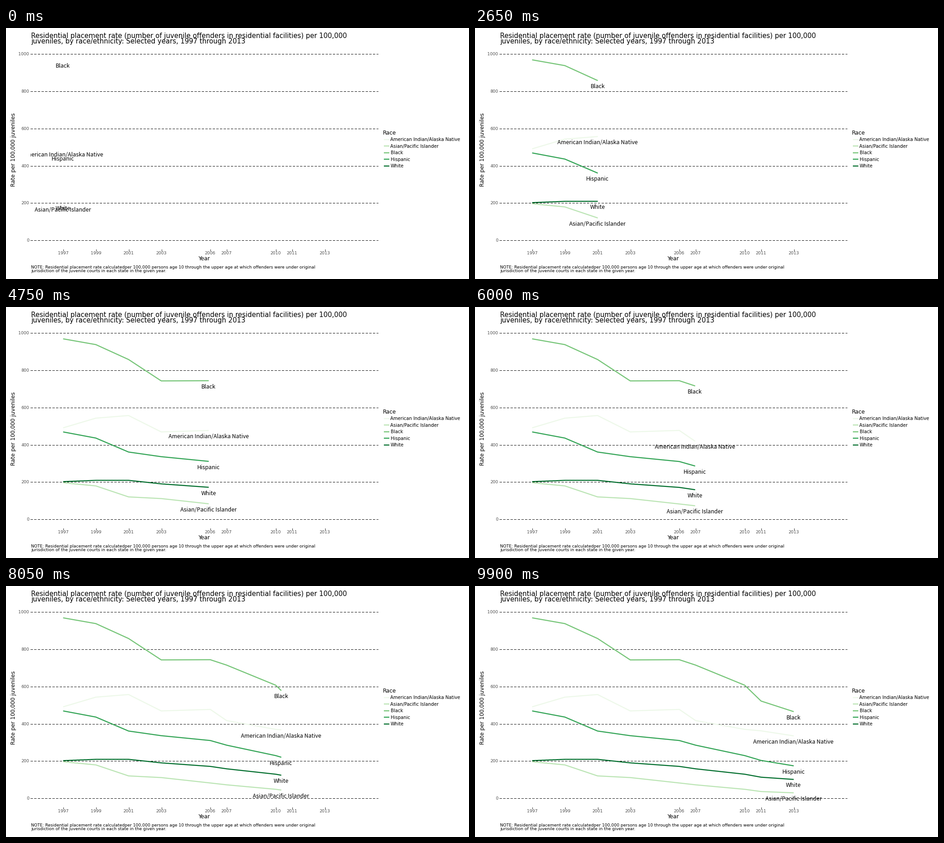
A matplotlib script that plays this animation: 1017x551 px, repeating every 10000 ms.

```python
import numpy as np
import matplotlib.pyplot as plt
from matplotlib.animation import FuncAnimation

W, H, DPI = 1017, 551, 64
FRAMES, STEP = 200, 25  # STEP frames per survey interval

YEARS = np.array([1997, 1999, 2001, 2003, 2006, 2007, 2010, 2011, 2013])
SERIES = {
    "American Indian/Alaska Native": ("#edf8e9", [490, 542, 556, 468, 476, 416, 369, 361, 334]),
    "Asian/Pacific Islander": ("#bae4b3", [195, 178, 119, 110, 81, 71, 47, 35, 28]),
    "Black": ("#74c476", [968, 937, 857, 742, 743, 714, 606, 521, 464]),
    "Hispanic": ("#31a354", [468, 435, 360, 335, 309, 284, 228, 202, 173]),
    "White": ("#006d2c", [201, 208, 208, 189, 170, 157, 128, 112, 100]),
}
X_1997, PX_PER_YEAR = 125.5, 35.92
Y_ZERO, PX_PER_RATE = 465.5, 0.4087
LEFT, RIGHT = 54, 817
LABEL_DROP = 16.8


def px(size):
    """Pixels to points."""
    return size * 72 / DPI


def year_x(year):
    return X_1997 + (np.asarray(year) - 1997) * PX_PER_YEAR


def rate_y(rate):
    return Y_ZERO - np.asarray(rate) * PX_PER_RATE


def pixel_axes(left, top, right, bottom):
    ax = fig.add_axes([left / W, 1 - bottom / H, (right - left) / W, (bottom - top) / H])
    ax.set(xlim=(left, right), ylim=(bottom, top))
    ax.axis("off")
    return ax


def write(x, y, text, size, color="black", **kwargs):
    return page.text(x, y, text, fontsize=px(size), color=color, va="baseline",
                     family="DejaVu Sans", **kwargs)


def cubic_in_out(t):
    return 4 * t ** 3 if t < 0.5 else 1 - 4 * (1 - t) ** 3


fig = plt.figure(figsize=(W / DPI, H / DPI), dpi=DPI, facecolor="white")
page = pixel_axes(0, 0, W, H)
panel = pixel_axes(LEFT, 36, RIGHT, 486)

# Titles and note
write(55, 22, "Residential placement rate (number of juvenile offenders in "
      "residential facilities) per 100,000", 14.75)
write(55, 34, "juveniles, by race/ethnicity: Selected years, 1997 through 2013", 14.75)
write(436, 509.5, "Year", 12, ha="center")
write(20.5, 267.5, "Rate per 100,000 juveniles", 12, ha="center", rotation=90,
      rotation_mode="anchor")
write(55, 528, "NOTE: Residential placement rate calculatedper 100,000 persons age 10 "
      "through the upper age at which offenders were under original", 9.07)
write(55, 536, "jurisdiction of the juvenile courts in each state in the given year.", 9.07)

# Grid and axis ticks
for rate in range(0, 1001, 200):
    y = np.floor(rate_y(rate)) + 0.5
    page.plot([LEFT, RIGHT], [y, y], color="black", lw=px(1), dashes=(4, 3),
              antialiased=False)
    write(50.8, y + 3.5, str(rate), 9.2, "#4d4d4d", ha="right")
for year in YEARS:
    x = np.floor(year_x(year)) + 0.5
    page.plot([x, x], [486, 489], color="#333333", lw=px(1), antialiased=False,
              solid_capstyle="butt")
    write(x, 497, str(year), 9.2, "#4d4d4d", ha="center")

# Legend
write(827.5, 234, "Race", 11.9)
lines, labels = [], []
for i, (name, (color, _)) in enumerate(SERIES.items()):
    y = 244.5 + 14.65 * i
    style = dict(color=color, lw=px(2.3), solid_capstyle="butt")
    page.plot([829.5, 841.5], [y, y], **style)
    write(844.5, y + 3.4, name, 9.95)
    lines += panel.plot([], [], solid_joinstyle="round", **style)
    labels.append(panel.text(0, 0, name, fontsize=px(12.3), family="Noto Sans CJK JP",
                             ha="center", va="baseline", clip_on=True, zorder=5))


def update(frame):
    done, step = divmod(frame, STEP)
    t = cubic_in_out(step / STEP)
    year = YEARS[done] + t * (YEARS[done + 1] - YEARS[done])
    years = np.append(YEARS[:done + 1], year)
    for line, label, (_, rates) in zip(lines, labels, SERIES.values()):
        x, y = year_x(years), rate_y(np.interp(years, YEARS, rates))
        line.set_data(x, y)
        label.set_position((x[-1] - 0.5, y[-1] + LABEL_DROP))
    return lines + labels


animation = FuncAnimation(fig, update, frames=FRAMES, interval=10000 / FRAMES,
                          init_func=lambda: update(0), repeat=True, repeat_delay=0)
plt.show()
```
